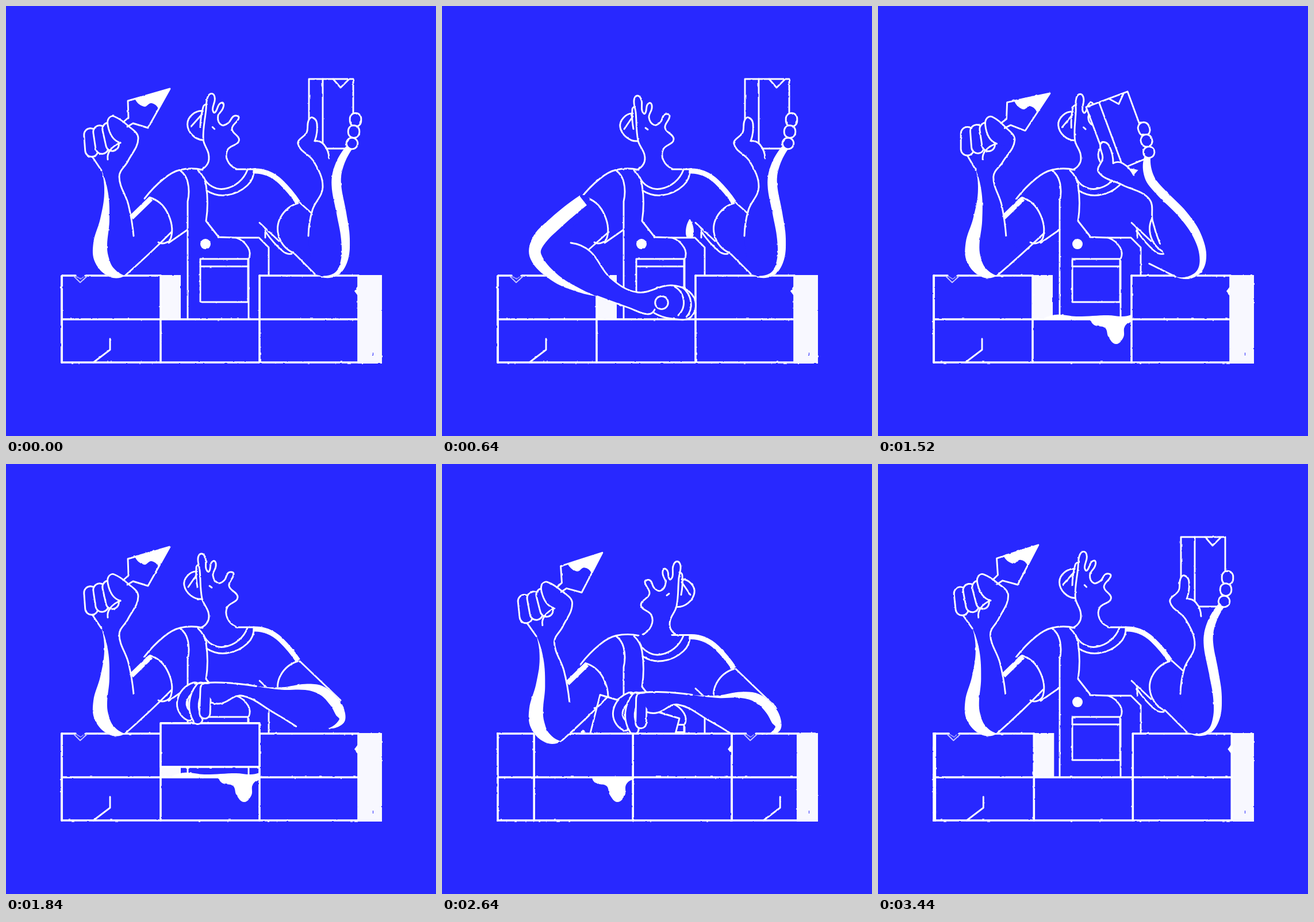
An HTML page with a canvas for the animation above (3520 ms loop, 748 by 748 pixels).

```html
<!DOCTYPE html>
<html lang="en">
<head>
<meta charset="utf-8">
<title>Bricklayer</title>
<style>
html, body { margin: 0; width: 100%; height: 100%; overflow: hidden; background: #2828ff; }
canvas { display: block; width: 100vw; height: 100vh; filter: url(#rough); }
svg { position: absolute; }
</style>
</head>
<body>
<svg width="0" height="0">
  <filter id="rough" x="0" y="0" width="1" height="1" color-interpolation-filters="sRGB">
    <feTurbulence id="grain" type="fractalNoise" baseFrequency=".15"/>
    <feDisplacementMap in="SourceGraphic" scale="2.4" xChannelSelector="R" yChannelSelector="G"/>
  </filter>
</svg>
<canvas width="748" height="748"></canvas>
<script>
const ctx = document.querySelector('canvas').getContext('2d');
const grain = document.getElementById('grain');
const BLUE = '#2828ff', WHITE = '#fff', PALE = '#f8f8ff';
const LOOP = 3520, STEP = 80, PEN = 2.9, THICK = 3.6;
const BRICK = 172, COURSE = 76, LEFT = 97, TOP = 469, PERIOD = 3 * BRICK;
const still = p => p;
let warp = still;

const clamp = u => Math.max(0, Math.min(1, u));
const smooth = u => u * u * (3 - 2 * u);

// Eased value from time,value pairs.
function key(t, ...k) {
  let v = k[1];
  for (let i = 2; i < k.length; i += 2)
    v += (k[i + 1] - k[i - 1]) * smooth(clamp((t - k[i - 2]) / (k[i] - k[i - 2])));
  return v;
}

// Points are "x,y"; a trailing "!" makes a sharp corner.
const read = s => s.split(' ').map(w => {
  const [x, y] = w.split(',').map(parseFloat);
  return { x, y, corner: w.endsWith('!') };
});
const points = src => typeof src === 'string' ? read(src) : src;

function unit(a, b) {
  const len = Math.hypot(b.x - a.x, b.y - a.y) || 1;
  return { x: (b.x - a.x) / len, y: (b.y - a.y) / len };
}

// Smooth curve; ends and corners continue the bend of the next point.
function trace(src, closed) {
  const p = points(src).map(q => ({ ...q, ...warp(q) })), n = p.length;
  const at = i => p[(i + n) % n];
  const hard = i => at(i).corner || !closed && (i === 0 || i === n - 1);
  const mirror = (d, c) => {
    const k = 2 * (d.x * c.x + d.y * c.y);
    return { x: k * c.x - d.x, y: k * c.y - d.y };
  };
  ctx.beginPath();
  ctx.moveTo(p[0].x, p[0].y);
  for (let i = 0; i < (closed ? n : n - 1); i++) {
    const a = at(i), b = at(i + 1), c = unit(a, b);
    let u = hard(i) ? null : unit(at(i - 1), b);
    let v = hard(i + 1) ? null : unit(a, at(i + 2));
    u = u || (v ? mirror(v, c) : c);
    v = v || mirror(u, c);
    const h = Math.hypot(b.x - a.x, b.y - a.y) * .36;
    ctx.bezierCurveTo(a.x + u.x * h, a.y + u.y * h, b.x - v.x * h, b.y - v.y * h, b.x, b.y);
  }
}

function line(src, width = PEN, color = WHITE, cap = 'round') {
  trace(src);
  ctx.lineCap = cap;
  ctx.lineWidth = width;
  ctx.strokeStyle = color;
  ctx.stroke();
}
const sharp = src => points(src).map(q => ({ ...q, corner: true }));
const poly = (src, width, color) => line(sharp(src), width, color);

function fill(src, color = WHITE) {
  trace(src, true);
  ctx.fillStyle = color;
  ctx.fill();
}

function rect(x, y, w, h, color) {
  ctx.fillStyle = color;
  ctx.fillRect(x, y, w, h);
}

// Outlined finger.
function tube(src, r) {
  line(src, 2 * r + PEN / 2);
  line(src, 2 * r - PEN * 1.5, BLUE);
}

// White shade along a spine, swelling on one side.
function shade(spine, width, start, skew) {
  const p = read(spine), n = p.length - 1;
  const inner = p.map((q, i) => {
    const d = unit(p[Math.max(0, i - 1)], p[Math.min(n, i + 1)]);
    const w = width * Math.sin(Math.PI * (start + (1 - start) * i / n) ** skew);
    return { x: q.x - d.y * w, y: q.y + d.x * w };
  });
  p[0].corner = p[n].corner = inner[0].corner = inner[n].corner = true;
  fill([...p, ...inner.reverse()]);
}

function rotate(p, c, deg) {
  const a = deg * Math.PI / 180, dx = p.x - c.x, dy = p.y - c.y;
  return { x: c.x + dx * Math.cos(a) - dy * Math.sin(a), y: c.y + dx * Math.sin(a) + dy * Math.cos(a) };
}

// Rotation that grows with the distance from the pivot.
const bend = (c, deg, reach) => p =>
  rotate(p, c, deg * Math.min(1, Math.hypot(p.x - c.x, p.y - c.y) / reach) ** .7);

// Forearm bends from the elbow, the hand turns at the wrist.
function rig(elbow, wrist, armDeg, handDeg, shift = 0) {
  const arm = bend(elbow, armDeg, Math.hypot(wrist.x - elbow.x, wrist.y - elbow.y));
  const w = arm(wrist);
  return p => {
    const a = arm(p), h = rotate(p, wrist, handDeg);
    const k = smooth(clamp((wrist.y + 20 - p.y) / 50));
    return {
      x: a.x + (h.x + w.x - wrist.x - a.x) * k + shift,
      y: a.y + (h.y + w.y - wrist.y - a.y) * k
    };
  };
}

function slide(t) {
  const u = clamp((t - 2240) / 1265);
  return PERIOD * (smooth(u) + u ** 3 * (10 - 15 * u + 6 * u * u)) / 2;
}

function torso() {
  line('342,285 303,285 275,300 241,335');
  line('303,286 316,306 316,340! 316,543');
  line('334,286 348,312 348,374! 370,402! 400,403! 421,420 422,440! 422,543');
  line('400,403! 440,403! 457,420! 457,543');
  line('451,390 451,403');
  line('344,298 380,318 420,285');
  line('349,321 384,329 420,312 431,285');
  line('400,284 431,284');
  line('430,287 455,291 478,306 508,342', 9, WHITE, 'butt');
  line('508,343 478,367 475,402 499,429');
  line('441,377 475,409');
  line('451,392 482,427 497,431');
  line('250,333 280,358 287,403 265,411');
  line('283,412 316,389');
  line('347,414 347,414.1', 18);
  poly('338,440 421,440 421,515 338,515 338,440');
  poly('338,453 421,453');
}

function head(t) {
  const tilt = key(t, 0, 9, 320, 0, 1040, 0, 1440, 6, 1600, 6, 1800, 0, 3040, 0, 3360, 9);
  const flip = key(t, 1840, 1, 2080, -1, 2720, -1, 2960, 1);
  const neck = { x: 372, y: 270 };
  warp = p => {
    const far = clamp((neck.y - p.y + 10) / 120);
    const q = rotate(p, neck, tilt * far);
    return { x: 374.5 + (q.x - 374.5) * flip, y: q.y };
  };
  line('338,285 351,274 352,258 341,234 337,185 334,164 340,156 347,164 348,182 353,187 357,172 363,169 365,178 360,194 369,207 380,202 387,189 396,191 388,212 403,232 385,249 385,268 400,283');
  line('336,175 331,180 333,214');
  line('332,187 310,211 341,235');
  line('332,192 317,214');
  line('354,212 358,215');
  warp = still;
}

function leftUp(deg) {
  const spine = '166,285 171,325 164,370 152,412 155,446 180,471 207,469';
  const thumb = '199,238 185,228 177,207 179,195 188,192 212,208';
  const hand = thumb + ' 230,230 212,270 197,297 213,346 222,400';
  line('252,335 218,368', 9, WHITE, 'butt');
  warp = rig({ x: 185, y: 465 }, { x: 180, y: 275 }, deg, deg * 3);
  fill([...read(hand + '! 250,430! 207,469!'), ...read(spine).reverse(), ...read('158,266 177,258!')], BLUE);
  shade(spine, -26, 0, 1.4);
  line('166,286 150,262');
  line('207,469 250,430 288,393');
  for (let i = 0; i < 3; i++) {
    const x = 147 + 16 * i, y = 224 - 5 * i;
    tube(`${x},${y} ${x + 2 + 2 * i},${y + 27}`, 12);
  }
  fill(thumb + '! 222,240!', BLUE);
  line(hand);
  line('177,267 181,251 199,238');
  poly('204,202 213,194 212,165 285,144 247,212 221,204 211,210');
  fill('224,161! 285,144! 265,179! 253,169 240,175');
  warp = still;
}

function leftDown(deg, pull) {
  const spine = '239,330 188,370 157,404 154,440 190,477 232,496 270,505';
  const top = '224,412 258,427 292,472 340,498 400,486 437,505 434,540 400,544 369,534';
  const under = '270,505 325,525 358,536 370,528';
  const swing = bend({ x: 175, y: 420 }, deg, 200);
  warp = p => {
    if (p.y < 412) return p;
    const q = swing(p);
    return { x: q.x - pull * clamp((p.x - 190) / 150), y: q.y };
  };
  fill([...read('258,337! ' + top + '!'), ...read(spine + ' ' + under).reverse()], BLUE);
  shade(spine, -24, .3, .9);
  line(top);
  line(under);
  line('402,487 420,510 411,538');
  line('418,489 433,515 425,541');
  tube('382,516 382,516.1', 12);
  warp = still;
  line('256,423 290,393');
}

// "inward" brings the brick from beside the body to the face.
function rightUp(inward, sway) {
  const spine = '602,249 586,282 583,310 592,360 598,405 593,447 572,471 537,466';
  const arm = '526,400 533,355 551,315 535,270 508,240 523,220 526,200 533,194 541,205 537,235';
  const palm = '537,235 553,241 562,265';
  line(`511,342 ${531 + 27 * inward},${360 + 32 * inward}`);
  warp = rig({ x: 570, y: 465 }, { x: 578, y: 262 }, sway - 29.5 * inward, sway * 1.5 - 20.5 * inward, -20 * inward);
  fill('527,127! 604,127! 604,248! 552,248! 527,220!', BLUE);
  poly('527,205 527,127 604,127 604,248 552,248');
  poly('551,127 551,245');
  poly('569,127 582,142 596,128');
  fill([...read(arm), ...read(palm + '!'), ...sharp('602,249'), ...read(spine + '!').slice(1)], BLUE);
  shade(spine, 17, .3, 1.2);
  line(arm);
  line(palm);
  line('499,428 537,466');
  for (let i = 0; i < 3; i++) {
    const x = 608 - 3 * i, y = 198 + 20.5 * i;
    tube(`${x},${y - 2 + i} ${x},${y + 2 - i + .1}`, 10.5);
  }
  warp = still;
}

function rightChest(deg) {
  const spine = '416,390 440,410 475,412 512,401 550,399 582,411 597,436 592,460 575,471';
  const under = '385,403 412,425 465,455 510,468 575,471';
  line('511,343 582,408');
  warp = bend({ x: 580, y: 440 }, deg, 220);
  tube('359,343 384,386', 7);
  tube('366,333 392,380', 8);
  tube('377,333 404,385', 8);
  tube('366,386 388,396', 9);
  fill([...read('394,370! 405,377'), ...read(spine + '!'), ...read(under).reverse(), ...read('380,388!')], BLUE);
  shade(spine, 18, 0, 1.3);
  line('386,338 405,377 416,390');
  line(under);
  warp = still;
}

function rightReach(deg, holding) {
  const spine = '435,388 480,389 520,383 552,387 578,408 590,434 586,452 560,460';
  const under = '357,418 375,419 410,405 465,433 505,457';
  line('511,343 582,411');
  warp = bend({ x: 575, y: 422 }, deg, 240);
  if (holding) {
    fill('254,470! 275,388! 413,429! 401,475!', BLUE);
    poly('252,478 275,388 413,429 399,482');
  }
  fill([...read('322,391! 375,383'), ...read(spine + '!'), ...read(under).reverse()], BLUE);
  shade(spine, 18, 0, 1.3);
  tube('328,392 306,417 319,442', 9);
  tube('338,392 327,420 334,448', 9);
  tube('347,394 346,437', 10);
  fill('340,388! 375,384 420,386! 410,402! 375,416 358,414!', BLUE);
  line('328,386 375,383 435,388');
  line(under);
  warp = still;
}

function rightArm(t) {
  if (t < 1680 || t >= 2800) {
    const inward = key(t, 1200, 0, 1520, 1, 2800, 1, 3000, 0);
    rightUp(inward, key(t, 2800, 0, 3040, -3.8, 3200, 1, 3360, 0));
  } else if (t >= 2000 && t < 2440) {
    rightChest(key(t, 2000, -14, 2200, 0, 2320, 0, 2440, -14));
  } else {
    rightReach(key(t, 1680, 12, 1920, -3, 2440, -5, 2640, 0, 2800, 8), t > 2100);
  }
}

function leftArm(t) {
  if (t >= 320 && t < 1120) {
    leftDown(key(t, 320, -40, 520, 0, 960, 0, 1120, -42), key(t, 640, 0, 960, 85, 1120, 40));
  } else {
    leftUp(key(t, 0, 0, 160, -3, 300, 18, 1100, 18, 1280, 3, 1520, 1.4, 1760, 0, 2240, 0, 2640, -.6, 3040, -3.9, 3440, -.6, LOOP, 0));
  }
}

function bricks(x, open, spread) {
  const low = TOP + COURSE, gap = LEFT + BRICK;
  ctx.save();
  ctx.translate(x, 0);
  rect(LEFT, low, PERIOD, COURSE, BLUE);
  for (let i = 0; i < 3; i++) if (i !== 1 || !open) {
    const bx = LEFT + i * BRICK;
    rect(bx, TOP, BRICK, COURSE, BLUE);
    poly(`${bx + (i ? 0 : 42)},${TOP} ${bx + BRICK},${TOP}`, THICK);
  }
  if (open) rect(gap, TOP - 1, 35, COURSE + 1, PALE);
  poly(`${LEFT},${TOP} ${LEFT + 24},${TOP}`, THICK);
  for (const y of [low, low + COURSE - 1]) poly(`${LEFT},${y} ${LEFT + PERIOD},${y}`, THICK);
  for (let i = 0; i < 4; i++) poly(`${LEFT + i * BRICK},${TOP} ${LEFT + i * BRICK},620`, THICK);
  poly('118,470 129,481 141,470', 2, '#c4c4ff');
  poly('122,470 130,475 135,471', 1.5, '#a0a0ff');
  poly('152,620 181,598 181,579');
  fill('613,487! 606,496! 613,505!');
  if (spread) mortar(spread, open);
  ctx.restore();
}

function mortar(spread, open) {
  const left = 442 - 156 * spread;
  ctx.save();
  ctx.beginPath();
  ctx.rect(left, 530, 443 - left, 70);
  ctx.clip();
  if (open) fill('286,545! 310,537 345,540 400,538 425,540 441,537! 441,547!');
  warp = ({ x, y }) => ({ x, y: 545 + (y - 545) * spread });
  fill('370,545! 376,555 395,560 401,576 414,588 427,576 429,558 441,549! 441,545!');
  warp = still;
  ctx.restore();
}

function wall(t) {
  const d = slide(t);
  ctx.save();
  ctx.beginPath();
  ctx.rect(LEFT - 2, 455, 555, 175);
  ctx.clip();
  bricks(-d, t < 1920, key(t, 640, 0, 1040, 1));
  if (d) bricks(PERIOD - d, true, 0);
  ctx.restore();
  poly('97,469 97,620', THICK);
  const face = d ? 617 : 612;
  rect(face, 468, 654 - face, 154, PALE);
  rect(638, 603, 1, 5, BLUE);
  if (t >= 1680 && t < 1920) {
    const x = LEFT + BRICK, y = TOP + key(t, 1680, -70, 1920, 0);
    rect(x, y, BRICK, COURSE, BLUE);
    ctx.lineWidth = THICK;
    ctx.strokeStyle = WHITE;
    ctx.strokeRect(x, y, BRICK, COURSE);
  }
}

function drop(x, y, floor) {
  ctx.save();
  ctx.beginPath();
  ctx.rect(x - 20, 0, 40, floor);
  ctx.clip();
  fill(`${x},${y}! ${x + 7},${y + 24} ${x},${y + 36} ${x - 7},${y + 24}`);
  ctx.restore();
}

function draw(t) {
  const u = clamp((t - 2240) / 1120);
  const bob = 15 * Math.sin(Math.PI * u);
  const behind = t >= 2440 && t < 2800;
  const withBody = f => {
    ctx.save();
    ctx.translate(0, bob);
    f();
    ctx.restore();
  };
  rect(0, 0, 748, 748, BLUE);
  withBody(() => {
    torso();
    head(t);
    if (behind) rightArm(t);
  });
  if (t >= 480 && t <= 720) drop(431, 370 + (t - 640) * .7, 402);
  if (t >= 2080 && t <= 2240) drop(250, 434 + (t - 2240) * .9, 470);
  if (t > 2240 && t <= 2640) line('245,466 245,466.1', 7);
  wall(t);
  withBody(() => {
    leftArm(t);
    if (!behind) rightArm(t);
  });
}

ctx.lineJoin = 'round';
let shown = -1;
function tick() {
  const n = Math.floor(performance.now() % LOOP / STEP);
  if (n !== shown) {
    shown = n;
    grain.setAttribute('seed', 1 + n % 4);
    draw(n * STEP);
  }
  requestAnimationFrame(tick);
}
tick();
</script>
</body>
</html>
```
